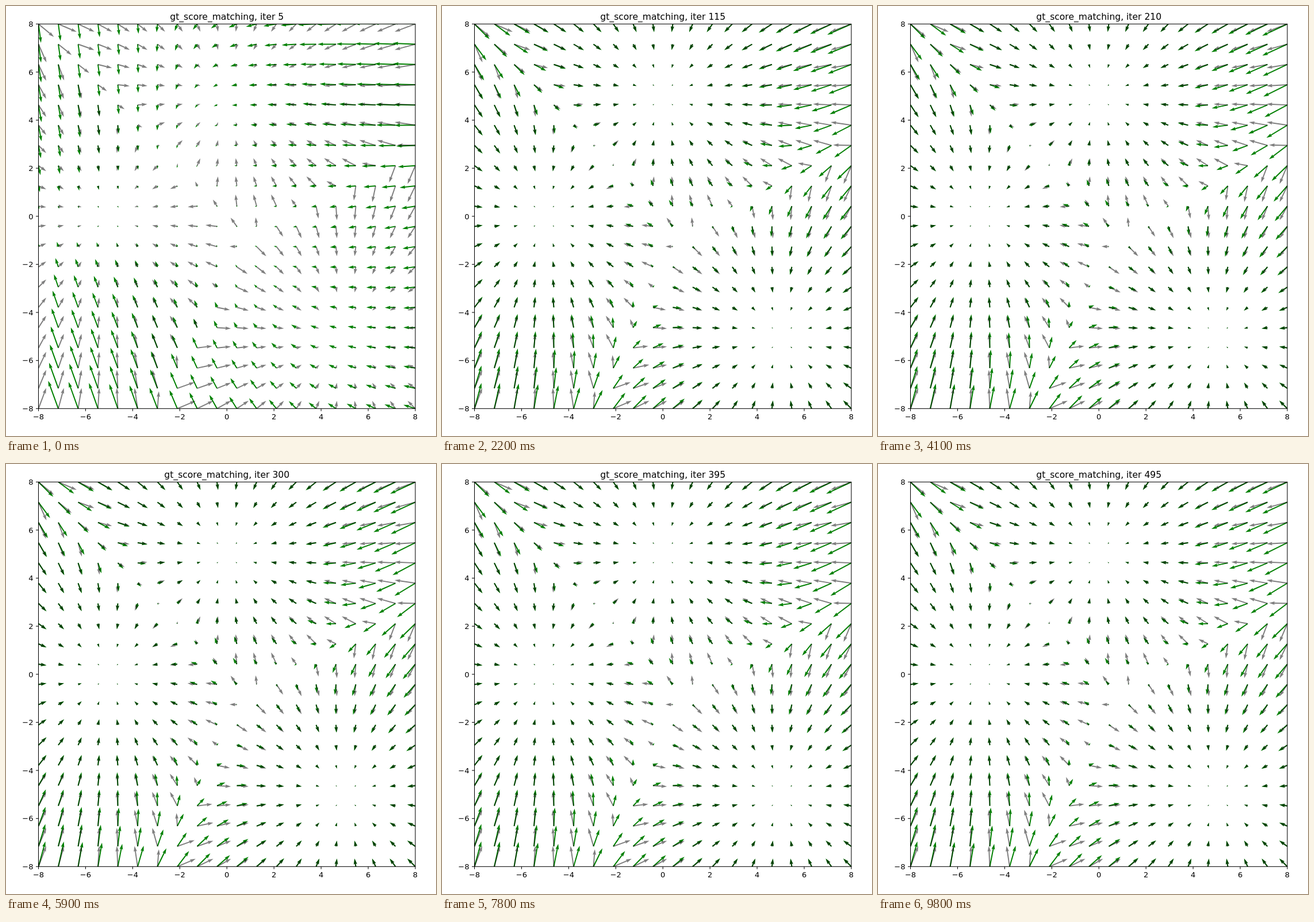
Write an HTML page with a canvas that moves like this. It is 748 px wide and 748 px high and loops after 9900 ms.

```html
<!DOCTYPE html>
<html>
<head>
<meta charset="utf-8">
<style>
html, body { margin: 0; width: 100%; height: 100%; overflow: hidden; background: #fff; }
canvas { display: block; }
</style>
</head>
<body>
<canvas id="plot" width="748" height="748"></canvas>
<script>
const ctx = document.getElementById('plot').getContext('2d');
const LEFT = 56.5, RIGHT = 712, TOP = 31.3, BOTTOM = 700.3, SPAN = RIGHT - LEFT;
const SIZE = 20, SHAFT = 0.003 * SPAN, MEAN_LENGTH = SPAN / 36;
const FRAME_MS = 100, FRAMES = 99;

const px = x => LEFT + (x + 8) / 16 * SPAN;
const py = y => BOTTOM - (y + 8) / 16 * (BOTTOM - TOP);
const clamp = v => Math.max(0, Math.min(1, v));
const sigmoid = v => 1 / (1 + Math.exp(-v));
const lerp = (a, b, t) => a + (b - a) * t;
const blend = (f, g, t) => f.map((v, i) => [lerp(v[0], g[i][0], t), lerp(v[1], g[i][1], t)]);

const grid = [];
for (let j = 0; j < SIZE; j++)
  for (let i = 0; i < SIZE; i++) grid.push([-8 + 16 * i / 19, -8 + 16 * j / 19]);

// Score of a mixture: weighted mean of the pulls towards its modes.
const modes = [[-5, 0], [0, 5], [5, -5]];
function pull(x, y, weight) {
  let sum = 0, u = 0, v = 0;
  modes.forEach(([mx, my], i) => {
    const w = weight(Math.hypot(mx - x, my - y), i);
    sum += w; u += w * (mx - x); v += w * (my - y);
  });
  return [u / sum, v / sum];
}

function normalise(field) {
  const mean = field.reduce((s, [u, v]) => s + Math.hypot(u, v), 0) / field.length;
  return field.map(([u, v]) => [u / mean * MEAN_LENGTH, v / mean * MEAN_LENGTH]);
}

const prior = [0.2, 0.3, 0.5];
const truth = normalise(grid.map(([x, y]) =>
  pull(x, y, (d, i) => prior[i] * Math.exp(-d * d / 2))));

// Trained model: soft borders between modes, and overshoot far from the data.
const softPrior = [1, 1, 1.4];
const trained = overshoot => normalise(grid.map(([x, y]) => {
  const k = 0.8 + 1.2 * sigmoid((y - x - 4) / 2);
  const [u, v] = pull(x, y, (d, i) => softPrior[i] * Math.exp(-k * d));
  const right = overshoot * clamp((x - 3.5) / 4.5) * sigmoid((y + 2) * 1.2);
  const low = clamp((-y - 3.5) / 4.5) * sigmoid(-1.5 * x);
  return [
    u - 1.4 * right - 0.6 * low * clamp((-x - 5) / 3),
    v - right * (0.7 + 2.2 * Math.exp(-(((y - 5) / 2.5) ** 2))) + 1.4 * low
  ];
}));

// Bilinear field from 5 x 5 vectors, top row first.
const coarse = rows => normalise(grid.map(([x, y]) => {
  const gx = (x + 8) / 4, gy = (8 - y) / 4;
  const i = Math.min(3, Math.floor(gx)), j = Math.min(3, Math.floor(gy));
  return [0, 1].map(c => {
    const at = (r, q) => rows[r][2 * q + c];
    return lerp(lerp(at(j, i), at(j, i + 1), gx - i),
                lerp(at(j + 1, i), at(j + 1, i + 1), gx - i), gy - j);
  });
}));

const keys = [
  [5, coarse([
    [4, -30, 2, -16, -11, -6, -30, -1, -37, 2],
    [5, -27, 1, -12, -5, 0, -21, 3, -34, 0],
    [1, -2, 1, -1, 0, 0, -7, -2, -21, -4],
    [-10, 30, -9, 22, -3, 8, -9, 2, -19, -1],
    [-17, 46, -13, 38, -12, 20, -12, 9, -19, 6]])],
  [65, coarse([
    [23, -22, 20, -5, 0, -9, -23, -6, -36, -2],
    [7, -28, 4, -9, 0, 4, -19, 4, -36, -7],
    [5, 0, -4, 0, 0, 2, -5, -8, -20, -25],
    [-5, 28, -1, 22, 3, 5, 0, -1, -14, -17],
    [-5, 45, 1, 38, 12, 20, 11, 12, -4, 1]])],
  [115, trained(0.6)],
  [210, trained(1)]
];

function learned(iter) {
  const n = keys.findIndex(([at]) => iter < at);
  if (n < 0) return keys[keys.length - 1][1];
  const [a, from] = keys[n - 1], [b, to] = keys[n];
  return normalise(blend(from, to, (iter - a) / (b - a)));
}

// Arrow outline in units of the shaft width.
function arrow(x, y, u, v) {
  const length = Math.hypot(u, v) / SHAFT;
  ctx.save();
  ctx.translate(x, y);
  ctx.rotate(Math.atan2(-v, u));
  ctx.scale(SHAFT, SHAFT);
  ctx.beginPath();
  if (length < 1) {
    for (let a = 0; a < 6; a++) ctx.lineTo(Math.cos(a * Math.PI / 3) / 2, Math.sin(a * Math.PI / 3) / 2);
  } else {
    const s = Math.min(1, length / 5), neck = length - 4.5 * s, barb = length - 5 * s;
    const half = [[0, s / 2], [neck, s / 2], [barb, 1.5 * s], [length, 0]];
    half.forEach(([a, b]) => ctx.lineTo(a, b));
    half.reverse().forEach(([a, b]) => ctx.lineTo(a, -b));
  }
  ctx.fill();
  ctx.restore();
}

function quiver(field, color) {
  ctx.fillStyle = color;
  field.forEach(([u, v], i) => arrow(px(grid[i][0]), py(grid[i][1]), u, v));
}

function line(x1, y1, x2, y2) {
  ctx.beginPath();
  ctx.moveTo(x1, y1);
  ctx.lineTo(x2, y2);
  ctx.stroke();
}

function axes() {
  ctx.strokeStyle = ctx.fillStyle = '#000';
  ctx.lineWidth = 1.04;
  ctx.strokeRect(LEFT, TOP, SPAN, BOTTOM - TOP);
  ctx.font = '12.99px "DejaVu Sans", sans-serif';
  for (let n = -8; n <= 8; n += 2) {
    const label = String(n).replace('-', '\u2212');
    line(px(n), BOTTOM, px(n), BOTTOM + 4.5);
    line(LEFT, py(n), LEFT - 4.5, py(n));
    ctx.textAlign = 'center';
    ctx.fillText(label, px(n), 719);
    ctx.textAlign = 'right';
    ctx.fillText(label, LEFT - 9.1, py(n) + 4.8);
  }
}

let shown = -1;
function draw(now) {
  requestAnimationFrame(draw);
  const frame = Math.floor(now / FRAME_MS) % FRAMES;
  if (frame === shown) return;
  shown = frame;
  const iter = 5 + 5 * frame;
  ctx.fillStyle = '#fff';
  ctx.fillRect(0, 0, 748, 748);
  ctx.save();
  ctx.beginPath();
  ctx.rect(LEFT, TOP, SPAN, BOTTOM - TOP);
  ctx.clip();
  quiver(learned(iter), '#008000');
  quiver(truth, 'rgba(0, 0, 0, 0.5)');
  ctx.restore();
  axes();
  ctx.font = '15.58px "DejaVu Sans", sans-serif';
  ctx.textAlign = 'center';
  ctx.fillText('gt_score_matching, iter ' + iter, (LEFT + RIGHT) / 2, 23.5);
}
draw(performance.now());
</script>
</body>
</html>
```
